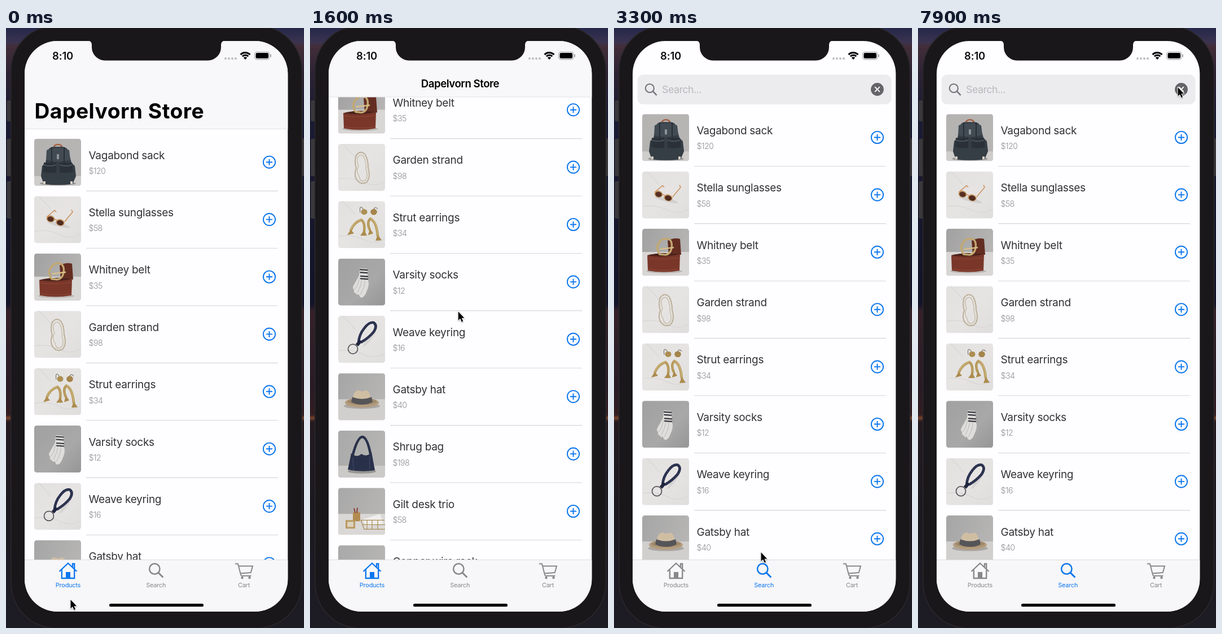
Write an HTML page with a canvas that moves like this. It is 528 px wide and 1061 px high and loops after 8 s.

```html
<!DOCTYPE html>
<html lang="en">
<head>
<meta charset="utf-8">
<title>Dapelvorn Store</title>
<style>
html, body { margin: 0; width: 100%; height: 100%; overflow: hidden; background: #1a171a; }
canvas { display: block; width: 100vw; height: 100vh; }
</style>
</head>
<body>
<canvas id="stage"></canvas>
<script>
const W = 528, H = 1061, LOOP = 8000, STEP = 100;
const STORE = 'Dapelvorn Store';
const BLUE = '#0a76ee', GREY = '#88878a';
const canvas = document.getElementById('stage');
const c = canvas.getContext('2d');
const ratio = window.devicePixelRatio || 1;
canvas.width = W * ratio;
canvas.height = H * ratio;

// Drawing helpers
function fill(d, color) {
  c.fillStyle = color;
  c.fill(new Path2D(d));
}
function line(d, color, width, dash = []) {
  c.strokeStyle = color;
  c.lineWidth = width;
  c.setLineDash(dash);
  c.stroke(new Path2D(d));
  c.setLineDash([]);
}
function rect(x, y, w, h, color, r = 0) {
  c.fillStyle = color;
  c.beginPath();
  c.roundRect(x, y, w, h, r);
  c.fill();
}
function oval(x, y, rx, ry, color, turn = 0) {
  c.fillStyle = color;
  c.beginPath();
  c.ellipse(x, y, rx, ry, turn, 0, Math.PI * 2);
  c.fill();
}
function ring(x, y, rx, ry, color, width, turn = 0) {
  c.strokeStyle = color;
  c.lineWidth = width;
  c.beginPath();
  c.ellipse(x, y, rx, ry, turn, 0, Math.PI * 2);
  c.stroke();
}
function text(s, x, y, size, color, { weight = 400, gap = 0, align = 'left' } = {}) {
  c.font = `${weight} ${size}px Inter, "Liberation Sans", sans-serif`;
  c.letterSpacing = gap + 'px';
  c.textAlign = align;
  c.fillStyle = color;
  c.fillText(s, x, y);
  return c.measureText(s).width;
}
function shade(x0, y0, x1, y1, stops) {
  const g = c.createLinearGradient(x0, y0, x1, y1);
  stops.forEach(([at, color]) => g.addColorStop(at, color));
  return g;
}

// Thumbnail scenes, drawn in an 83 by 83 box
function room(wall, floor, horizon) {
  rect(0, 0, 83, 83, shade(0, 0, 83, 30, [[0, wall], [1, '#b6b5b4']]));
  rect(0, horizon, 83, 83 - horizon, floor);
}
function marble() {
  rect(0, 0, 83, 83, shade(0, 0, 83, 83, [[0, '#e2e1e0'], [0.5, '#e6e4e3'], [1, '#dfdedd']]));
  line('M0 62 Q25 58 45 68 T83 66 M8 0 Q22 14 30 24', '#d7d6d5', 1.2);
}

function backpack() {
  room('#b4b3b2', '#cfcdcb', 66);
  oval(42, 79, 32, 3, '#918f8d');
  line('M34 17 Q35 10 42 10 Q49 10 50 17', '#a5603f', 2.6);
  fill('M24 22 Q26 14 35 14 H50 Q60 15 61 24 L66 42 L72 48 L74 66 L68 80 Q42 83 17 80 L12 66 L14 48 L20 42 Z', '#353d45');
  fill('M22 20 Q41 12 62 20 L64 37 Q42 43 21 37 Z', '#424b54');
  fill('M17 42 H39 V59 Q28 62 16 58 Z M45 42 H67 L69 58 Q57 62 45 59 Z', '#2a3138');
  line('M17 46 Q28 50 39 46 M45 46 Q57 50 67 46', '#525c65', 1.5);
  line('M31 15 V45 M53 15 V45', '#272e35', 2);
  rect(40, 27, 4, 9, '#8c9499', 1);
  rect(16, 75, 4, 5, '#d8d2c5');
  rect(64, 75, 4, 5, '#d8d2c5');
}
function sunglasses() {
  marble();
  oval(43, 50, 21, 3.5, '#d2d0ce', 0.25);
  line('M22 37 L36 25 L39 28 M54 45 L68 28 L66 24', '#cc9768', 1.7);
  oval(29, 40, 7.5, 6, '#c99868', 0.25);
  oval(46, 46.5, 7.8, 6, '#c99868', 0.25);
  oval(29, 40.5, 5.8, 4.6, '#573022', 0.25);
  oval(46, 47, 6, 4.6, '#502b20', 0.25);
  line('M35 41 Q38 40 40 43', '#d09e6d', 2);
}
function belt() {
  room('#a2a1a1', '#d9d7d5', 41);
  oval(39, 75, 32, 3.5, '#b9b5b2');
  fill('M45 21 Q57 15 67 18 L69 46 H47 Z', '#632d22');
  fill('M9 47 Q37 40 67 45 L66 74 Q38 79 10 74 Z', '#793629');
  fill('M9 47 Q37 40 67 45 Q37 52 9 47 Z', '#4c231b');
  line('M10 71 Q38 76 66 71 M10 52 Q38 56 66 51', '#8e4938', 1);
  line('M31 45 Q23 34 30 24 Q37 15 47 18 Q54 22 52 34 Q50 45 41 46 Z', '#c2a871', 3.4);
  line('M31 36 L56 33', '#d8bf88', 2.4);
}
function necklace() {
  marble();
  const loop = 'M32 20 Q39 11 47 18 Q53 27 53 42 Q58 60 50 68 Q41 73 34 65 Q27 57 32 43 Q28 31 32 20 Z';
  line(loop, '#d3d0ca', 2.6);
  line(loop, '#b3a182', 1.6, [2.2, 0.8]);
  line('M35 23 Q42 16 46 25 Q50 35 49 45 Q54 60 47 65 Q39 68 37 57 Q31 49 36 39 Q32 30 35 23 Z', '#b8a988', 1.3, [2, 0.8]);
}
function earrings() {
  marble();
  line('M39 20 Q37 8 42 11 Q45 14 46 18 M61 18 Q65 7 70 14', '#77705f', 1.1);
  oval(46, 19, 5.5, 5, '#ad8f52');
  oval(63, 19, 5.8, 5.4, '#a5854b');
  line('M22 52 Q28 37 41 33 Q48 38 46 54 M56 51 Q50 37 57 31 Q68 36 70 62', '#b89c5f', 4.6);
  line('M22 51 Q28 36 41 32 M57 30 Q68 35 70 60', '#d0b87e', 1.3);
  fill('M22 50 L28 57 L16 60 Z M46 51 L51 61 H39 Z M56 48 L62 57 L53 60 Z M70 59 L77 69 L66 70 Z', '#ab8b4d');
}
function socks() {
  rect(0, 0, 83, 83, shade(0, 0, 83, 83, [[0, '#a2a1a1'], [0.6, '#a9a8a8'], [1, '#979696']]));
  fill('M38 17 L51 18 L53 38 Q56 46 50 59 Q46 69 41 69 Q37 68 37 63 Q33 66 31 61 Q27 61 28 55 Q24 52 28 46 L37 30 Z', '#dedddb');
  line('M38 33 L34 48 L29 55 M42 36 Q41 49 34 60 M47 37 Q48 49 39 64', '#b8b6b4', 0.9);
  line('M38 19.5 L52 20.5 M38.5 24.5 L52 25.5 M39 31 L53 32 M39 35.5 L53 36.5', '#34343a', 2.2);
}
function keyring() {
  marble();
  oval(55, 41, 17, 3, '#d5d4d3', -0.9);
  ring(26, 58.5, 8.5, 8.5, '#55545a', 1.7);
  const loop = 'M36 47 Q37 33 46 22 Q55 10 63 12 Q70 17 63 28 Q54 39 40 47';
  line(loop, '#262c48', 4.6);
  line(loop, '#414a6c', 1.4, [2, 2]);
  line('M33 52 L40 44', '#20253f', 6);
}
function hat() {
  room('#a5a5a5', '#d1cfcd', 46);
  oval(42, 58, 32, 5, '#aaa7a3');
  oval(42, 52, 30, 8.5, '#b39c7e');
  oval(42, 50, 26, 6, '#a08a6c');
  fill('M25 50 Q26 31 36 30 Q42 34 49 30 Q57 32 59 50 Q42 58 25 50 Z', '#d0bea3');
  fill('M25 42 Q42 49 59 42 L61 51 Q42 60 23 51 Z', '#555458');
}
function bag() {
  room('#a9a9a9', '#cccac8', 62);
  oval(42, 72, 25, 4, '#979594');
  line('M25 46 Q34 11 43 11 Q52 12 58 46', '#293148', 4.5);
  fill('M23 40 Q33 49 41 41 Q50 48 59 38 L65 70 Q42 74 17 69 Z', '#29314a');
  line('M27 47 Q25 60 28 70 M56 46 Q55 60 56 70', '#3b4561', 1.3);
}
function deskTrio() {
  room('#a9a8a8', '#dad8d6', 46);
  rect(26, 43, 13, 16, '#b28b51', 2);
  line('M30 44 L28 36 M33 44 L34 35', '#8b3e32', 2);
  rect(13, 57, 17, 15, '#b99a62', 1);
  rect(16, 60, 11, 9, '#ddd2bc');
  fill('M43 56 L74 46 L80 64 L49 68 Z', '#f0efed');
  line('M40 57 L46 73 H83 M40 57 H82 M43 65 H83 M51 57 V73 M60 57 V73 M70 57 V73', '#a98d58', 1.2);
}
function wireRack() {
  room('#a9a9a9', '#d2d0ce', 55);
  oval(44, 72, 26, 4, '#b0adaa');
  fill('M42 66 L52 26 L60 25 L54 68 Z', '#eae8e6');
  fill('M52 67 L57 25 L63 27 L60 67 Z', '#8b4e4c');
  line('M21 37 L24 70 H60 L64 37 Z M22 46 H63 M23 54 H62 M23 62 H61 M30 37 L32 70 M39 37 V70 M47 37 V70 M56 37 L54 70', '#a88b69', 1);
}
function ceramics() {
  room('#a5a4a4', '#cfcdcb', 54);
  oval(42, 68, 29, 5, '#b3b0ad');
  fill('M14 48 H43 Q42 67 29 67 Q16 67 14 48 Z', '#eceae7');
  fill('M41 38 H65 L62 67 H45 Z', '#dcd9d4');
  oval(53, 38, 12, 3, '#bfbbb5');
  oval(28.5, 48, 14.5, 3, '#c8c4be');
}

const products = [
  ['Vagabond sack', 120, backpack],
  ['Stella sunglasses', 58, sunglasses],
  ['Whitney belt', 35, belt],
  ['Garden strand', 98, necklace],
  ['Strut earrings', 34, earrings],
  ['Varsity socks', 12, socks],
  ['Weave keyring', 16, keyring],
  ['Gatsby hat', 40, hat],
  ['Shrug bag', 198, bag],
  ['Gilt desk trio', 58, deskTrio],
  ['Copper wire rack', 18, wireRack],
  ['Soothe ceramic set', 28, ceramics]
];
const ROW = 101.4;

function productRow([name, price, scene], y, last) {
  c.save();
  c.translate(50, y);
  c.beginPath();
  c.roundRect(0, 0, 83, 83, 4.5);
  c.clip();
  scene();
  c.restore();
  text(name, 146.5, y + 35.5, 19, '#323133', { gap: -0.28 });
  text('$' + price, 146.5, y + 62, 14.2, '#8e8d92', { weight: 300, gap: -0.55 });
  ring(466.5, y + 41.2, 10.6, 10.6, BLUE, 1.9);
  line(`M461 ${y + 41.2} h11 M466.5 ${y + 35.7} v11`, BLUE, 1.9);
  if (!last) rect(142, y + 91.6, 340, 1.1, '#d6d5d8');
}
function productList(items, top) {
  items.forEach((item, i) => {
    const y = top + i * ROW;
    if (y > -ROW && y < 945) productRow(item, y, i === items.length - 1);
  });
}

// Smooth curve through [time, value] points, flat at turning points
function track(points) {
  const slope = i => {
    const [a, b, d] = [points[i - 1], points[i], points[i + 1]];
    if (!a || !d || (b[1] - a[1]) * (d[1] - b[1]) <= 0) return 0;
    return (d[1] - a[1]) / (d[0] - a[0]);
  };
  return t => {
    const n = points.findIndex(p => p[0] > t);
    if (n < 0) return points[points.length - 1][1];
    const [t0, v0] = points[n - 1], [t1, v1] = points[n];
    const d = t1 - t0, u = (t - t0) / d, w = 1 - u;
    return v0 * (1 + 2 * u) * w * w + slope(n - 1) * d * u * w * w
      + v1 * u * u * (3 - 2 * u) - slope(n) * d * u * u * w;
  };
}
const scrollAt = track([[0, 0], [600, 0], [1100, 376], [1300, 376], [2000, 93],
  [2200, 0], [2350, -45], [2700, -16.5], [3000, 0]]);
const pointerX = track([[0, 114], [400, 250], [600, 254], [1100, 260], [1300, 260],
  [2000, 268], [2700, 278], [3000, 266], [3200, 266], [4000, 128], [6900, 128], [7500, 460]]);
const pointerY = track([[0, 1011], [400, 800], [600, 800], [1100, 412], [1300, 412],
  [2000, 721], [2300, 850], [2700, 930], [3000, 964], [3200, 964], [4000, 111], [6900, 111], [7500, 105]]);

const SEARCH_AT = 3100, FOCUS_AT = 4500, CLEAR_AT = 7700;
const WORD = 'socks', KEYS = [5300, 5500, 5700, 6000, 6200];

function magnifier(x, y, scale, color) {
  c.save();
  c.translate(x, y);
  c.scale(scale, scale);
  ring(0, 0, 9.2, 9.2, color, 2.5);
  line('M6.7 6.7 L15 15', color, 3);
  c.restore();
}

function productsTab(t) {
  const scroll = scrollAt(t);
  productList(products, 196 - scroll);
  const bottom = Math.max(122, 178.5 - Math.max(0, scroll));
  rect(33, 23, 467, bottom - 23, '#f8f7f9');
  rect(33, bottom - 0.5, 467, 1, '#e3e2e5');
  const folded = Math.min(1, Math.max(0, (scroll - 30) / 26));
  c.globalAlpha = 1 - folded;
  text(STORE, 50.5, bottom - 18.5, 37.2, '#000', { weight: 700, gap: 0.5 });
  c.globalAlpha = folded;
  text(STORE, 266, 104.5, 18.6, '#000', { weight: 600, gap: -0.45, align: 'center' });
  c.globalAlpha = 1;
}

function searchTab(t) {
  const typed = t < CLEAR_AT ? KEYS.filter(k => k <= t).length : 0;
  const term = WORD.slice(0, typed);
  productList(products.filter(p => p[0].toLowerCase().includes(term)), 152.3);
  rect(41.5, 82.5, 450, 52.5, '#ececee', 10);
  magnifier(63.3, 106.5, 0.82, '#737276');
  const width = text(term || 'Search...', 85, 115, 17.8, term ? '#111' : '#b9b8bc', { gap: -0.5 });
  const lastKey = Math.max(FOCUS_AT, ...KEYS.filter(k => k <= t));
  if (t >= FOCUS_AT && (t - lastKey) % 1000 < 500) {
    rect(84.5 + (term ? width : 0), 97.5, 2.2, 23, '#2c7de8', 1);
  }
  oval(466.5, 108.5, 11.4, 11.4, '#656468');
  line('M462.2 104.2 l8.6 8.6 m0 -8.6 l-8.6 8.6', '#fff', 1.9);
}

function tabBar(search) {
  rect(33, 940, 467, 93, '#f7f6f8');
  rect(33, 940, 467, 1, '#dcdbde');
  const home = search ? GREY : BLUE, find = search ? BLUE : GREY;
  line('M94.5 961 L110 946.5 L125.5 961 M98.8 958 V973 H121.2 V958 M118 953 V947.5 H121.2 V956', home, 2.3);
  rect(106, 962, 8, 11, home);
  magnifier(263.3, 956.5, 1, find);
  line('M406 947.5 H411 L416 967 Q416.5 968.7 418 968.7 H434.5 M412 951.5 H437 L433.8 963 L415.5 964.5', GREY, 2);
  oval(418.5, 972, 2.2, 2.2, GREY);
  oval(431.5, 972, 2.2, 2.2, GREY);
  const label = (s, x, color) => text(s, x, 988.5, 10.9, color, { gap: -0.2, align: 'center' });
  label('Products', 110, home);
  label('Search', 265.7, find);
  label('Cart', 421.5, GREY);
  rect(183, 1018, 167, 5.3, '#000', 2.6);
}

function statusBar() {
  text('8:10', 82, 55.5, 18.4, '#0b0b0c', { weight: 600, gap: -0.1 });
  for (let i = 0; i < 4; i++) oval(389 + i * 6, 54, 2, 2, '#bcbbbf');
  c.strokeStyle = '#000';
  for (const r of [11.5, 7]) {
    c.lineWidth = 3;
    c.beginPath();
    c.arc(424, 55, r, -Math.PI * 0.76, -Math.PI * 0.24);
    c.stroke();
  }
  fill('M424 56 L420.8 52.5 A4.6 4.6 0 0 1 427.2 52.5 Z', '#000');
  c.strokeStyle = '#a3a2a5';
  c.lineWidth = 1.1;
  c.beginPath();
  c.roundRect(440.6, 42.2, 26.4, 13.4, 4);
  c.stroke();
  rect(442.5, 44, 22.6, 9.8, '#000', 2.4);
  rect(468.2, 46.5, 1.7, 5, '#a3a2a5', 1);
}

function phone() {
  rect(0, 0, W, H, shade(0, 0, 0, H, [[0, '#26284a'], [0.024, '#3a3350'], [0.03, '#432e3a'],
    [0.08, '#2a2233'], [0.15, '#1b1c34'], [0.46, '#131428'], [0.472, '#352129'],
    [0.6, '#281b24'], [0.645, '#341e22'], [0.65, '#7a432d'], [0.656, '#241b21'],
    [0.8, '#1b1920'], [1, '#1d1b24']]));
  for (const [y, h] of [[128, 37], [196, 66], [271, 66]]) rect(1.5, y, 9, h, '#3a383b', 2);
  rect(520, 195, 8, 67, '#3a383b', 2);
  rect(8, -5, 517, 1067, '#2b282b', 80);
  rect(9.5, -3.5, 514, 1064, '#1a171a', 79);
}

function pointer(t) {
  c.save();
  c.translate(pointerX(t), pointerY(t));
  c.shadowColor = 'rgba(0,0,0,.3)';
  c.shadowBlur = 2 * ratio;
  c.shadowOffsetY = ratio;
  c.lineJoin = 'round';
  const arrow = 'M0.5 0 V15.5 L4 12.3 L6.6 18.2 L9 17.1 L6.5 11.3 H11.2 Z';
  line(arrow, '#fff', 2);
  c.shadowColor = 'transparent';
  fill(arrow, '#000');
  c.restore();
}

function draw(t) {
  c.setTransform(canvas.width / W, 0, 0, canvas.height / H, 0, 0);
  phone();
  c.save();
  c.beginPath();
  c.roundRect(33, 23, 466.3, 1009, 58);
  c.clip();
  rect(33, 23, 467, 1010, '#fefdff');
  const search = t >= SEARCH_AT;
  if (search) searchTab(t);
  else productsTab(t);
  tabBar(search);
  statusBar();
  c.restore();
  fill('M145 22 Q152 23 152 30 V34 A23.5 23.5 0 0 0 175.5 57.5 H357.5 A23.5 23.5 0 0 0 381 34 V30 Q381 23 388 22 Z', '#1a171a');
  pointer(t);
}

const start = performance.now();
function tick(now) {
  const t = Math.max(0, now - start) % LOOP;
  draw(Math.floor(t / STEP) * STEP);
  requestAnimationFrame(tick);
}
draw(0);
requestAnimationFrame(tick);
</script>
</body>
</html>
```
